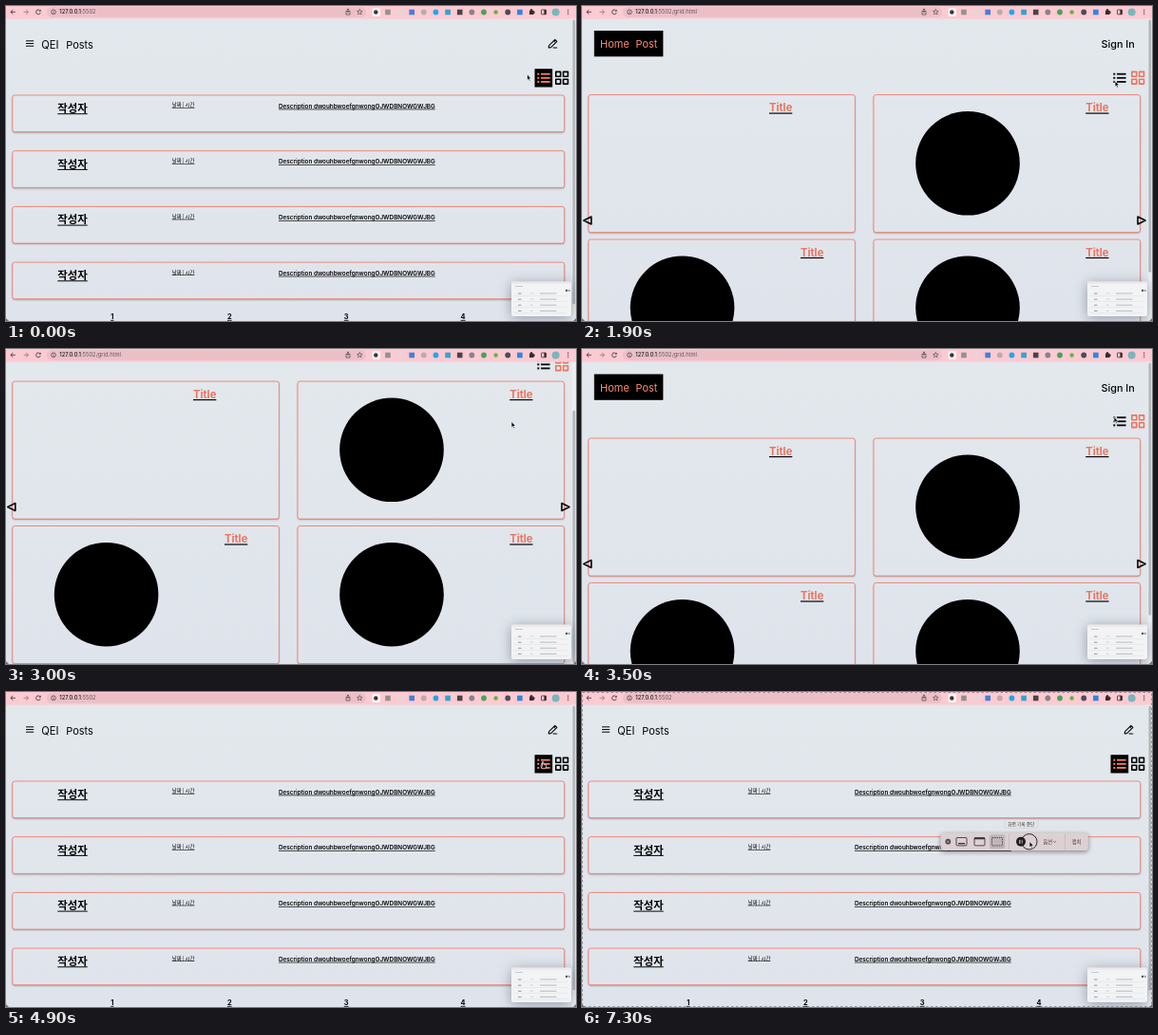
An HTML page with a canvas for the animation above (7400 ms loop, 600 by 332 pixels).

```html
<!DOCTYPE html>
<html lang="en">
<head>
<meta charset="utf-8">
<title>Posts</title>
<style>
html, body { margin: 0; width: 100%; height: 100%; overflow: hidden; background: #e1e6ec; }
canvas { display: block; width: 600px; height: 332px; }
</style>
</head>
<body>
<canvas id="stage"></canvas>
<script>
const W = 600, H = 332, BAR = 13.5, LOOP = 7400, STEP = 100;
const INK = '#050505', CORAL = '#ea7561', EDGE = '#f08474';
const LATIN = 'Inter, "Noto Sans CJK KR", sans-serif';
const KOREAN = '"Noto Sans CJK KR", "Noto Sans CJK", sans-serif';

const canvas = document.getElementById('stage');
const ratio = window.devicePixelRatio || 1;
canvas.width = W * ratio;
canvas.height = H * ratio;
const c = canvas.getContext('2d');

// Cursor stops: time, x, y
const route = [
  [0, 548.5, 72], [500, 580, 80.5], [1600, 580, 80.5],
  [2300, 532, 76.5], [3200, 532, 76.5], [3500, 560, 71.5],
  [3700, 564.5, 73.5], [5500, 564.5, 73.5], [6300, 545, 68],
  [7000, 471, 157.5], [LOOP, 471, 157.5]
];
// Page scroll with a slight rubber band at the top
const scrollStops = [
  [0, 0], [2500, 0], [2900, 59.5], [3000, 59.5], [3300, -.5], [3500, -.5], [3700, 0], [LOOP, 0]
];

const smooth = p => p * p * (3 - 2 * p);
const easeOut = p => 1 - (1 - p) ** 3;

function along(stops, t, ease) {
  let i = 1;
  while (i < stops.length - 1 && t > stops[i][0]) i++;
  const a = stops[i - 1], b = stops[i];
  const p = ease((t - a[0]) / (b[0] - a[0]));
  return a.slice(1).map((v, k) => v + (b[k + 1] - v) * p);
}

function rect(x, y, w, h, color) {
  c.fillStyle = color;
  c.fillRect(x, y, w, h);
}

function round(x, y, w, h, r, fill, stroke, line = 1) {
  c.beginPath();
  c.roundRect(x, y, w, h, r);
  if (fill) { c.fillStyle = fill; c.fill(); }
  if (stroke) { c.strokeStyle = stroke; c.lineWidth = line; c.stroke(); }
}

function disc(x, y, r, color) {
  c.fillStyle = color;
  c.beginPath();
  c.arc(x, y, r, 0, Math.PI * 2);
  c.fill();
}

function ring(x, y, r, color, line) {
  c.strokeStyle = color;
  c.lineWidth = line;
  c.beginPath();
  c.arc(x, y, r, 0, Math.PI * 2);
  c.stroke();
}

function path(points, stroke, line, fill, closed) {
  c.beginPath();
  for (let i = 0; i < points.length; i += 2) c.lineTo(points[i], points[i + 1]);
  if (closed) c.closePath();
  if (fill) { c.fillStyle = fill; c.fill(); }
  if (stroke) { c.strokeStyle = stroke; c.lineWidth = line; c.stroke(); }
}

function text(s, x, y, size, color = INK, weight = 400, family = LATIN) {
  c.font = `${weight} ${size}px ${family}`;
  c.fillStyle = color;
  c.fillText(s, x, y);
  return c.measureText(s).width;
}

function underlined(s, x, y, size, drop, line, color, weight, family) {
  const w = text(s, x, y, size, color, weight, family);
  rect(x, y + drop, w, line, INK);
}

function shadowed(color, blur, dy, draw) {
  c.save();
  c.shadowColor = color;
  c.shadowBlur = blur * ratio;
  c.shadowOffsetY = dy * ratio;
  draw();
  c.restore();
}

function backdrop() {
  const g = c.createLinearGradient(0, BAR, 0, H);
  g.addColorStop(0, '#e2e8ec');
  g.addColorStop(1, '#dfe4ec');
  rect(0, 0, W, H, g);
}

// The shadow falls only outside the card, which itself is transparent
function card(x, y, w, h) {
  c.save();
  c.beginPath();
  c.rect(0, 0, W, H * 2);
  c.roundRect(x, y, w, h, 2.5);
  c.clip('evenodd');
  shadowed('rgba(70,50,55,.45)', 2, 1, () => round(x, y, w, h, 2.5, EDGE));
  c.restore();
  round(x, y, w, h, 2.5, null, EDGE, .9);
}

function listIcon(color) {
  for (const y of [71.7, 75.8, 79.9]) {
    rect(559.3, y - 1, 2, 2, color);
    rect(563, y - .9, 9.6, 1.8, color);
  }
}

function gridIcon(color) {
  c.strokeStyle = color;
  c.lineWidth = 1.6;
  for (const x of [578.8, 586.6])
    for (const y of [69.4, 77.2]) c.strokeRect(x, y, 4.9, 4.9);
}

function pen(x, y) {
  path([x, y + 9, x + .4, y + 6.6, x + 6.7, y + .4, x + 8.7, y + 2.4, x + 2.4, y + 8.6], INK, 1.1, null, true);
  path([x + 5.4, y + 1.8, x + 7.4, y + 3.8], INK, 1);
  path([x + 4.5, y + 9, x + 9, y + 9], INK, 1);
}

function listPage() {
  for (const y of [36.8, 39.5, 42.2]) rect(21, y - .5, 8.2, 1, INK);
  text('QEI', 37.2, 44.6, 11.2);
  text('Posts', 63.2, 44.6, 11);
  pen(571.2, 35);
  rect(556.5, 66.2, 18.7, 19.3, INK);
  listIcon('#ff7f66');
  gridIcon(INK);
  for (let i = 0; i < 4; i++) {
    const y = 94 + i * 58.7;
    card(6.8, y, 581, 38.7);
    underlined('작성자', 54.3, y + 17.8, 11.4, 1.4, 1, INK, 700, KOREAN);
    underlined('날짜 | 시간', 174.7, y + 12.4, 5.4, .9, .6, INK, 500, KOREAN);
    underlined('Description dwouhbwoefgnwongOJWDBNOWGWJBG', 287, y + 13.6, 6.35, 1, .7, INK, 600);
    underlined(String(i + 1), 110.2 + i * 122.8, 330.2, 7.4, .7, .8, INK, 700);
  }
}

function gridPage(scroll) {
  c.save();
  c.translate(0, -scroll);
  rect(12.8, 26, 72.6, 27.3, '#000');
  text('Home', 19, 44.2, 11, '#ff8a70');
  text('Post', 56.5, 44.2, 11, '#ff8a70');
  text('Sign In', 546.6, 44.2, 10.8, INK, 500);
  listIcon(INK);
  gridIcon(CORAL);
  for (let i = 0; i < 4; i++) {
    const right = i % 2, y = i < 2 ? 93.6 : 246;
    card(right ? 307 : 6.8, y, 280.6, 145);
    if (i) disc(right ? 406 : 105.6, y + 72.2, 54.8, '#000');
    underlined('Title', [197, 530.2, 230, 530.2][i], y + 17.7, 11.2, 1.2, 1.2, CORAL, 700);
  }
  path([9.8, 222, 9.8, 230, 1.8, 226], INK, 1.6, null, true);
  path([585, 222, 585, 230, 593, 226], INK, 1.6, null, true);
  c.restore();
}

function scrollbar(scroll, total) {
  const view = H - BAR, k = view / total;
  rect(595.6, BAR, 4.4, view, '#eceff1');
  round(596.4, BAR + 1 + Math.max(0, scroll) * k, 2.8, view * k - 2, 1.4, '#b3b7ba');
}

function toolbar(url, loading) {
  const dark = '#453c40';
  rect(0, 0, W, BAR, '#fdcad2');
  round(43, 1, 336, 10.8, 5.4, '#ecbfc7');
  path([9.8, 6.3, 5, 6.3], dark, .9);
  path([7.3, 3.9, 4.9, 6.3, 7.3, 8.7], dark, .9);
  path([18.6, 6.3, 23.4, 6.3], '#8f7e84', .9);
  path([21.1, 3.9, 23.5, 6.3, 21.1, 8.7], '#8f7e84', .9);
  if (loading) {
    path([31.7, 4.1, 36.1, 8.5], dark, .9);
    path([36.1, 4.1, 31.7, 8.5], dark, .9);
  } else {
    c.strokeStyle = dark;
    c.lineWidth = .9;
    c.beginPath();
    c.arc(34, 6.3, 2.4, .3, 5.5);
    c.stroke();
    path([36.7, 3.4, 36.7, 5.8, 34.3, 5.8], null, 0, dark, true);
  }
  ring(50, 6.3, 2.4, dark, .7);
  rect(49.7, 5.9, .7, 1.8, dark);
  rect(49.7, 4.7, .7, .7, dark);
  const w = text('127.0.0.1', 56.3, 8.3, 5.8, '#1d181a', 500);
  text(url, 56.3 + w, 8.3, 5.8, '#62565b');

  c.strokeStyle = dark;
  c.lineWidth = .7;
  c.strokeRect(358, 5.4, 4, 3.6);
  path([360, 7, 360, 3], dark, .7);
  path([358.8, 4.1, 360, 2.9, 361.2, 4.1], dark, .7);
  const star = [];
  for (let i = 0; i < 10; i++) {
    const r = i % 2 ? 1.3 : 2.9, a = i * Math.PI / 5 - Math.PI / 2;
    star.push(372.3 + r * Math.cos(a), 6.4 + r * Math.sin(a));
  }
  path(star, dark, .6, null, true);

  const tints = ['#3b3436', '#8c9490', '#e6d5d8', '#3f82d8', '#b5adb0', '#20a6e8', '#2fa5cf',
    '#49434a', '#85858a', '#48a45c', '#5cb83c', '#4b4d55', '#2d87e0'];
  round(385.5, 2, 8.5, 9, 2, '#fff2f4');
  tints.forEach((tint, i) => {
    const x = 389.3 + i * 12.63;
    if ([0, 4, 5, 8, 9, 10, 11].includes(i)) disc(x, 6.5, i === 0 || i === 10 ? 2.2 : 2.9, tint);
    else rect(x - 2.8, 3.7, 5.6, 5.6, tint);
  });
  round(551, 4.4, 4.6, 4.6, .6, '#332c2f');
  disc(553, 4.2, 1.1, '#332c2f');
  disc(555.6, 6.7, 1.1, '#332c2f');
  round(563.5, 4, 5, 4.8, .5, null, '#332c2f', .8);
  rect(566.4, 4, 2.1, 4.8, '#332c2f');
  disc(578.7, 6.4, 4, '#77b7bd');
  for (const y of [4.2, 6.4, 8.6]) disc(591.7, y, .7, dark);
}

function thumbnail() {
  shadowed('rgba(50,60,75,.45)', 14, 2, () => round(532, 290.5, 63, 36.5, 2, '#f1f3f5'));
  rect(533, 291.5, 61, 1, '#f4dce0');
  rect(536, 295.2, 8, .8, '#b9bdc1');
  rect(589, 298.8, 2.2, 2.2, '#55585d');
  rect(591.8, 298.8, 2, 2.2, '#a3a6aa');
  for (let i = 0; i < 4; i++) {
    const y = 302.6 + i * 6.1;
    rect(534, y + 2.6, 57, .5, '#e3dfe2');
    rect(539, y, 3.5, .9, '#8b8f94');
    rect(552, y, 2.6, .6, '#b4b8bc');
    rect(562, y, 17.5, .7, '#a0a4a8');
  }
}

function captureControls() {
  const ink = '#3d383a';
  c.setLineDash([2.5, 2.5]);
  c.strokeStyle = 'rgba(110,105,110,.75)';
  c.lineWidth = .8;
  c.strokeRect(.5, .5, W - 1, H - 1);
  c.setLineDash([]);

  round(444.8, 134.5, 35, 9, 1, '#e3e4e7', '#c8cbd0', .5);
  c.textAlign = 'center';
  text('화면 기록 중단', 462.3, 140.9, 4.7, ink, 400, KOREAN);

  shadowed('rgba(40,30,35,.5)', 5, 1.5, () => round(377.5, 148.5, 155.3, 18.6, 3.5, '#ddd0d3'));
  disc(385.3, 157.7, 2.9, '#4f494c');
  path([384.2, 156.6, 386.4, 158.8], '#ddd0d3', .7);
  path([386.4, 156.6, 384.2, 158.8], '#ddd0d3', .7);
  round(429, 150.3, 16.2, 15, 2, '#bfb5b8');
  round(394, 153.5, 11, 8.4, 1, null, ink, .9);
  rect(396, 159, 7, 1.4, ink);
  round(413, 153.5, 11, 8.4, 1, null, ink, .9);
  rect(413, 153.5, 11, 1.8, ink);
  c.setLineDash([1.3, 1]);
  round(431.5, 153.5, 11, 8.4, .5, null, ink, .9);
  c.setLineDash([]);
  rect(449, 149.5, .6, 16.6, '#bdb1b4');
  rect(508, 149.5, .6, 16.6, '#bdb1b4');
  disc(462, 157.8, 5, '#1f1c1e');
  rect(460.3, 155.8, 1.1, 4, '#e5dadd');
  rect(462.6, 155.8, 1.1, 4, '#e5dadd');
  text('옵션', 490.2, 159.7, 5.2, ink, 400, KOREAN);
  text('캡처', 520.6, 159.7, 5.2, ink, 400, KOREAN);
  c.textAlign = 'left';
  path([496.2, 157.2, 497.5, 158.4, 498.8, 157.2], ink, .7);
}

function arrow(x, y) {
  path([x, y, x, y + 6.2, x + 1.4, y + 5, x + 2.5, y + 7.3, x + 3.5, y + 6.8,
    x + 2.5, y + 4.6, x + 4.3, y + 4.4], '#f5f5f5', .7, '#000', true);
}

function hand(x, y) {
  path([x, y, x + 1.1, y, x + 1.3, y + 2.7, x + 4, y + 3.3, x + 4, y + 5.2, x + 3.2, y + 7.2,
    x + .3, y + 7.2, x - 1.8, y + 4.3, x - 1.1, y + 3.8, x, y + 4.7], '#f5f5f5', .7, '#111', true);
}

function draw(t) {
  const grid = t >= 1600 && t < 4400;
  const gridUrl = t >= 1300 && t < 4200;
  const loading = (t >= 1000 && t < 1600) || (t >= 4000 && t < 4400);
  const scroll = along(scrollStops, t, easeOut)[0];
  const [x, y] = along(route, t, smooth);

  c.setTransform(ratio, 0, 0, ratio, 0, 0);
  c.lineCap = 'butt';
  c.lineJoin = 'round';
  backdrop();
  if (grid) gridPage(scroll); else listPage();
  scrollbar(scroll, grid ? 378 : 336);
  toolbar(gridUrl ? ':5502/grid.html' : ':5502', loading);
  thumbnail();
  path([0, 329, 0, H, 3, H], null, 0, '#6d7378', true);
  path([W, 329, W, H, 597, H], null, 0, '#6d7378', true);
  if (t >= 6600) captureControls();
  if (t >= 7000) ring(470.8, 157.8, 8.2, '#2b2729', 1);
  if (t >= 3700 && t < 5700) hand(x, y); else arrow(x, y);
}

function frame() {
  const t = performance.now() % LOOP;
  draw(Math.floor(t / STEP) * STEP);
  requestAnimationFrame(frame);
}
frame();
</script>
</body>
</html>
```
